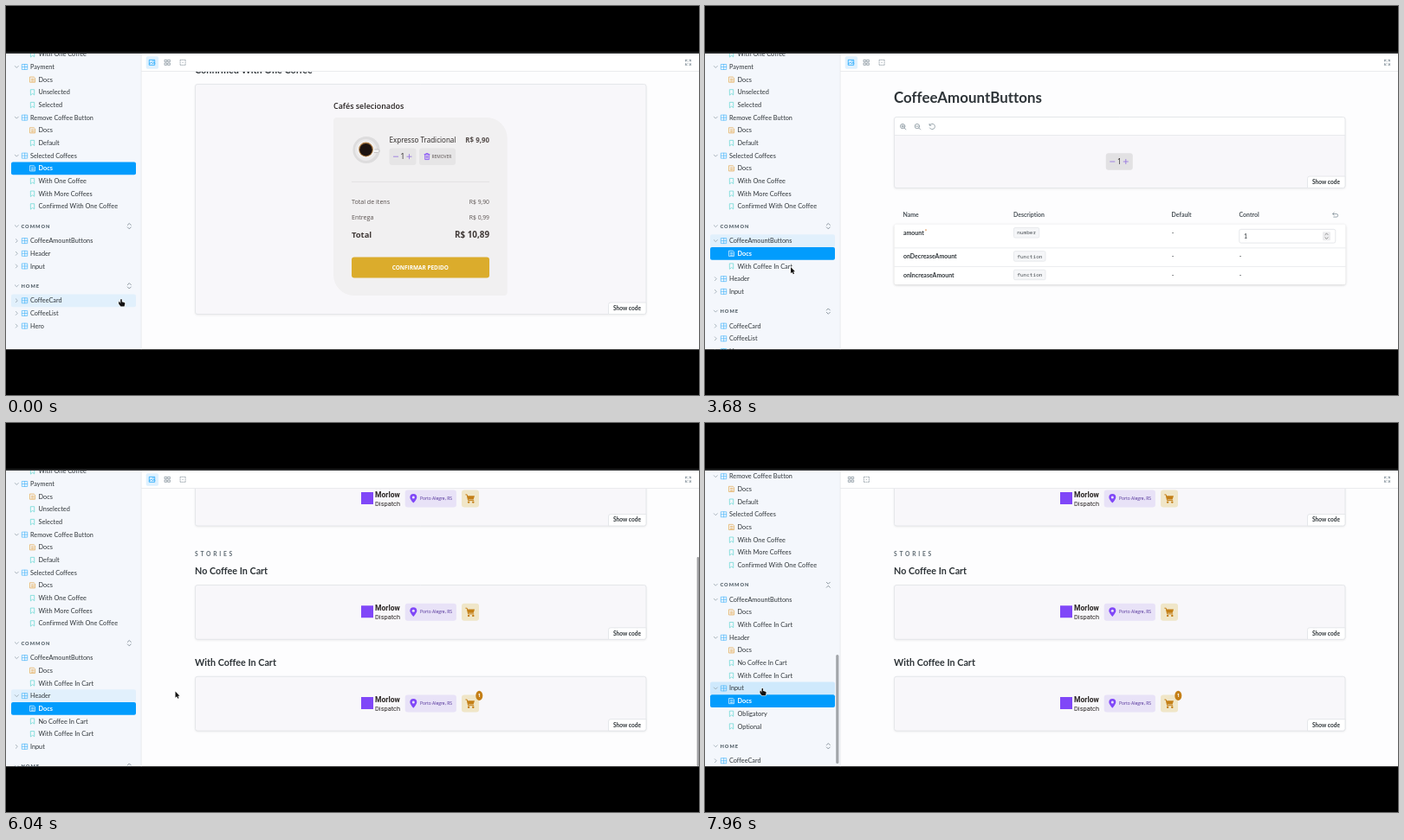
These frames come from a looping animation (800 by 450 pixels, 8000 ms). An HTML page with a canvas:

```html
<!DOCTYPE html>
<html lang="en">
<head>
<meta charset="utf-8">
<title>Component docs</title>
<style>
html, body { margin: 0; width: 100%; height: 100%; overflow: hidden; background: #000; }
canvas { display: block; width: 800px; height: 450px; }
</style>
</head>
<body>
<canvas id="stage" width="800" height="450"></canvas>
<script>
const g = document.getElementById('stage').getContext('2d');
const LOOP = 8000, TOP = 55, BOTTOM = 397.4, BAR = 76;
const UI = 'Lato, "Open Sans", sans-serif';
const APP = '"Open Sans", "Noto Sans", sans-serif';
const MONO = '"Noto Sans Mono", "DejaVu Sans Mono", monospace';
const INK = '#2e3438', BLUE = '#029cfd', GREY = '#7d8b95', LINE = '#e5e7ea';
const PURPLE = '#8047f8', GOLD = '#c47f17';

// Times of the three clicks in the sidebar
const CLICK = { amount: 1800, header: 4480, input: 7840 };

// ---------- drawing helpers ----------
function text(s, x, y, size, o = {}) {
  g.font = `${o.w || 400} ${size}px ${o.f || UI}`;
  g.letterSpacing = (o.ls || 0.01) + 'px'; // any spacing turns ligatures off
  g.textAlign = o.a || 'left';
  g.fillStyle = o.c || INK;
  g.fillText(s, x, y + size * 0.35);
  g.letterSpacing = '0px';
}
function box(x, y, w, h, r, fill, stroke) {
  g.beginPath();
  g.roundRect(x, y, w, h, r);
  if (fill) { g.fillStyle = fill; g.fill(); }
  if (stroke) { g.strokeStyle = stroke; g.lineWidth = 1; g.stroke(); }
}
function disc(x, y, rx, ry, fill) {
  g.beginPath();
  g.ellipse(x, y, rx, ry, 0, 0, 7);
  g.fillStyle = fill;
  g.fill();
}
function path(d, x, y, color, width = 0.8, fill) {
  g.save();
  g.translate(x, y);
  const p = new Path2D(d);
  if (fill) { g.fillStyle = fill; g.fill(p); }
  if (color) {
    g.strokeStyle = color;
    g.lineWidth = width;
    g.lineCap = g.lineJoin = 'round';
    g.stroke(p);
  }
  g.restore();
}
function clip(x, y, w, h, draw) {
  g.save();
  g.beginPath();
  g.rect(x, y, w, h);
  g.clip();
  draw();
  g.restore();
}

// ---------- motion ----------
const ease = k => k * k * (3 - 2 * k);
const ramp = (t, a, b) => ease(Math.min(1, Math.max(0, (t - a) / (b - a))));

const TRAIL = [
  [40, 133, 339.2], [440, 95.3, 272.5], [1120, 95.3, 272.5], [1160, 95.8, 272.5],
  [2760, 95.8, 272.5], [3150, 203, 296], [3640, 101, 301], [3680, 99, 302],
  [4200, 46, 313], [4600, 46, 313], [5120, 195.5, 310.5], [6160, 195.5, 310.5],
  [6480, 83, 310], [7000, 83, 310], [7480, 66.3, 307], [LOOP, 66.3, 307]
];
function pointer(t) {
  let [, x, y] = TRAIL[0];
  for (let i = 1; i < TRAIL.length; i++) {
    const a = TRAIL[i - 1], b = TRAIL[i], k = ramp(t, a[0], b[0]);
    if (t >= a[0]) { x = a[1] + (b[1] - a[1]) * k; y = a[2] + (b[2] - a[2]) * k; }
  }
  return { x, y };
}
const SIDE_MAX = 67.4, PAGE_MAX = 93.3;
const sideScroll = t => SIDE_MAX * ramp(t, 6440, 6700);
const pageScroll = t => PAGE_MAX * ramp(t, 5440, 5960);

// ---------- sidebar ----------
function tree(t) {
  const sel = t < CLICK.amount ? 'Selected Coffees' : t < CLICK.header ? 'CoffeeAmountButtons'
    : t < CLICK.input ? 'Header' : 'Input';
  const rows = [];
  let y = 55.8, last = 'story';
  const add = (kind, label, more) => {
    if (rows.length) y += kind === 'head' ? 22.8 : last === 'head' ? 17 : 14.67;
    last = kind;
    rows.push({ kind, label, y, ...more });
  };
  const part = (label, stories, open = true) => {
    add('part', label, { open, focus: label === sel && t >= CLICK.amount });
    if (!open) return;
    add('docs', 'Docs', { sel: label === sel });
    stories.forEach(s => add('story', s));
  };
  add('story', 'With One Coffee');
  part('Payment', ['Unselected', 'Selected']);
  part('Remove Coffee Button', ['Default']);
  part('Selected Coffees', ['With One Coffee', 'With More Coffees', 'Confirmed With One Coffee']);
  add('head', 'COMMON', { all: t >= CLICK.input });
  part('CoffeeAmountButtons', ['With Coffee In Cart'], t >= CLICK.amount);
  part('Header', ['No Coffee In Cart', 'With Coffee In Cart'], t >= CLICK.header);
  part('Input', ['Obligatory', 'Optional'], t >= CLICK.input);
  add('head', 'HOME');
  ['CoffeeCard', 'CoffeeList', 'Hero'].forEach(s => part(s, [], false));
  return rows;
}
function chevron(x, y, open) {
  path(open ? 'M-2-1L0 1L2-1' : 'M-1-2L1 0L-1 2', x, y, '#8a98a2', 0.7);
}
function row(r, y, hover) {
  if (r.kind === 'head') {
    chevron(12.3, y, true);
    text(r.label, 17.5, y, 5.7, { w: 900, c: '#5c6870', ls: 0.95 });
    path(r.all ? 'M-2-3L0-1L2-3M-2 3L0 1L2 3' : 'M-2-1.2L0-3.2L2-1.2M-2 1.2L0 3.2L2 1.2', 142.3, y, '#6b7983', 0.75);
    return;
  }
  const bar = color => box(6, y - 7.4, 144, 14.8, 2, color);
  const tint = () => bar('rgba(2,156,253,.08)');
  if (r.sel) bar(BLUE);
  else {
    if (r.focus) tint();
    if (hover) tint();
  }
  if (r.kind === 'part') {
    chevron(12.3, y, r.open);
    path('M-3-3H3V3H-3ZM0-3V3M-3 0H3', 21.7, y, '#3fb2fb', 0.65);
    text(r.label, 28, y, 7.25);
  } else if (r.kind === 'docs') {
    path('M-2.8-3.1H1.5L2.8-1.8V3.1H-2.8ZM-1.4-1H1.4M-1.4.5H1.4M-1.4 2H1.4', 30.7, y, r.sel ? '#fff' : '#e3a446', 0.65);
    text(r.label, 37.5, y, 7.3, r.sel ? { w: 700, c: '#fff' } : {});
  } else {
    path('M-2-3.1H2V3.1L0 1.5L-2 3.1Z', 30.7, y, '#5fd6d2', 0.7);
    text(r.label, 37.5, y, 7.35);
  }
}
function sidebar(t, p) {
  g.fillStyle = '#f4f7fc';
  g.fillRect(0, TOP, 156, BOTTOM - TOP);
  const s = sideScroll(t);
  const live = t < CLICK.amount || (t > 3720 && t < CLICK.header) || t > 7000;
  for (const r of tree(t)) {
    const y = r.y - s;
    if (y < 46 || y > 406) continue;
    row(r, y, live && p.x < 150 && Math.abs(p.y - y) < 7.33);
  }
  let thumb = null;
  if (t >= CLICK.amount && t < 2600) thumb = [253, 132];
  else if (t >= CLICK.header && t < 5440) thumb = [243, 126];
  else if (t >= 6440 && t < 7400) thumb = [243 + 24 * s / SIDE_MAX, 126];
  else if (t >= CLICK.input) thumb = [268, 126];
  if (thumb) box(151.2, thumb[0], 3.2, thumb[1], 1.6, '#a2a6aa');
}

// ---------- toolbar ----------
const GRID = 'M-3-3H-.7V-.7H-3ZM.7-3H3V-.7H.7ZM-3 .7H-.7V3H-3ZM.7 .7H3V3H.7Z';
const OUTLINE = 'M-3-1.7V-3H-1.7M-.5-3H.5M1.7-3H3V-1.7M3-.5V.5M3 1.7V3H1.7M.5 3H-.5M-1.7 3H-3V1.7M-3 .5V-.5M-.3 0H.3';
function toolbar(full) {
  g.fillStyle = '#fff';
  g.fillRect(156, TOP, 644, BAR - TOP);
  g.fillStyle = LINE;
  g.fillRect(156, BAR - 0.8, 644, 0.8);
  if (full) {
    box(161.7, 58.3, 14.4, 14.4, 2, '#dff1fe');
    path('M-3-3H3V3H-3ZM-3 1.6L-1-.5L1 1.5L2-.1L3 1M.8-1.5H1.6', 168.7, 65.3, BLUE, 0.7);
  }
  const x = full ? 186.4 : 168.7;
  path(GRID, x, 65.3, GREY, 0.7);
  path(OUTLINE, x + 17.7, 65.3, GREY, 0.65);
  path('M-3-1.2V-3H-1.2M1.2-3H3V-1.2M3 1.2V3H1.2M-1.2 3H-3V1.2M-3-3L-1-1M3-3L1-1M3 3L1 1M-3 3L-1 1', 787.5, 65.3, GREY, 0.7);
}

// ---------- page pieces ----------
function panel(y, h, tools) {
  g.save();
  g.shadowColor = 'rgba(0,0,0,.09)';
  g.shadowBlur = 3;
  g.shadowOffsetY = 1;
  box(218.5, y, 520.5, h, 2.5, '#f8f7fa');
  g.restore();
  if (tools) {
    box(218.5, y, 520.5, 21, [2.5, 2.5, 0, 0], '#fff');
    g.fillStyle = LINE;
    g.fillRect(218.5, y + 20.5, 520.5, 0.8);
    for (const [x, sign] of [[228.7, 'M-1.8-.4H.8M-.5-1.7V.9'], [245.4, 'M-1.8-.4H.8']])
      path('M2.2-.4A2.7 2.7 0 1 1-3.2-.4A2.7 2.7 0 1 1 2.2-.4M1.5 1.6L3.3 3.4' + sign, x, y + 11, GREY, 0.75);
    path('M-2.8-1.8A3.2 3.2 0 1 1-2.9 1.5M-3.2-3.2V-1.3H-1.3', 262.3, y + 11, GREY, 0.75);
  }
  box(218.5, y, 520.5, h, 2.5, null, LINE);
  const end = y + h;
  box(695.5, end - 13.5, 43.5, 13.5, [2.5, 0, 2.5, 0], '#fff', LINE);
  text('Show code', 717, end - 6.8, 6.55, { w: 700, a: 'center' });
}
function spinner(x, y, t) {
  const a = (t - 2400) / 700 * Math.PI * 2;
  g.lineWidth = 1;
  for (const [from, to, c] of [[0, 6.3, '#d3d3d6'], [a - 0.9, a + 1.3, '#66696d']]) {
    g.beginPath();
    g.arc(x, y, 8, from, to);
    g.strokeStyle = c;
    g.stroke();
  }
}
function counter(x, y, fill) {
  box(x - 15.5, y - 9.7, 31, 19.4, 3, fill);
  path('M-2.6 0H2.6', x - 8, y, '#9a7ae0', 0.9);
  path('M-2.6 0H2.6M0-2.6V2.6', x + 7.5, y, '#9a7ae0', 0.9);
  text('1', x, y, 8.4, { f: APP, a: 'center', c: '#272221' });
}

function orderPage() {
  text('Confirmed With One Coffee', 218, 74, 10.8, { w: 700 });
  panel(90.5, 266, false);
  const o = { f: APP, c: '#574f4d' }, right = { ...o, a: 'right' };
  const dark = { f: APP, c: '#403937', w: 700 };
  text('Cafés selecionados', 378, 116.3, 8.9, { f: APP, w: 600, c: '#272221' });
  box(378, 129, 200.7, 206, [4, 24, 4, 24], '#f1f0f1');

  disc(416, 166.5, 15.6, 15.6, '#dddcdd');
  disc(415.5, 166.5, 12.5, 12.5, '#ebeaeb');
  box(423, 166, 8, 3.4, 1.5, '#f7f7f7', '#c3c1c2');
  disc(415.5, 166, 9.8, 9.8, '#f8f7f6');
  disc(415.5, 166, 8.4, 8.4, '#a97a45');
  disc(415.5, 166.2, 7.3, 7.3, '#1d1310');

  text('Expresso Tradicional', 442.5, 155, 8.06, { f: APP, c: '#272221' });
  text('R$ 9,90', 558, 155, 7.9, { ...dark, c: '#574f4d', a: 'right' });
  counter(458, 174.2, '#e6e5e6');
  box(477, 164.5, 42, 19.4, 3, '#e6e5e6');
  path('M-3-2.5H3M-1.2-2.5V-3.6H1.2V-2.5M-2.3-2.5V3.4H2.3V-2.5M-.8-.8V1.8M.8-.8V1.8', 486, 174.2, PURPLE, 0.8);
  text('REMOVER', 491.5, 174.4, 4.95, o);
  g.fillStyle = '#e4e3e4';
  g.fillRect(399, 202.8, 159, 1.3);
  text('Total de itens', 399, 227, 7.1, o);
  text('R$ 9,90', 558, 227, 6.8, right);
  text('Entrega', 399, 244.5, 7.1, o);
  text('R$ 0,99', 558, 244.5, 6.8, right);
  text('Total', 399, 265, 9.4, dark);
  text('R$ 10,89', 558, 265, 9.8, { ...dark, a: 'right' });
  box(399, 290.5, 159, 24, 3, '#dbac2c');
  text('CONFIRMAR PEDIDO', 478.3, 302.3, 6.45, { f: APP, w: 700, c: '#fff', a: 'center' });
}

function pill(label, x, y) {
  g.font = `400 6.05px ${MONO}`;
  box(x, y - 6, g.measureText(label).width + 7.5, 11.5, 1.5, '#f5f6f8', '#e8eaed');
  text(label, x + 3.8, y - 0.3, 6.05, { f: MONO, c: '#4a5055' });
}
function amountPage(t) {
  const ready = t >= 2520, h = ready ? 61 : 42, end = 149.5 + h;
  text('CoffeeAmountButtons', 218, 106, 16.9, { w: 700 });
  panel(128.5, h + 21, true);
  if (ready) counter(478.3, 180, '#e2e1e3');
  else spinner(478.5, 170.5, t);

  const bold = { w: 700 }, size = 6.95;
  [['Name', 228.5], ['Description', 356], ['Default', 538.5], ['Control', 616.5]]
    .forEach(([s, x]) => text(s, x, end + 31, size, { w: 700, c: '#4b5359' }));
  path('M-3-1H1.2A1.8 1.8 0 0 1 1.2 2.6H-2M-1.4-2.7L-3.1-1L-1.4 .7', 727.7, end + 31, GREY, 0.75);
  g.save();
  g.shadowColor = 'rgba(0,0,0,.2)';
  g.shadowBlur = 3;
  g.shadowOffsetY = 0.8;
  box(218.5, end + 42, 521, 69.7, 2.5, '#fff');
  g.restore();
  g.fillStyle = LINE;
  g.fillRect(218.5, end + 69, 521, 0.8);
  g.fillRect(218.5, end + 90.4, 521, 0.8);
  [['amount', 'number', 52], ['onDecreaseAmount', 'function', 79.2], ['onIncreaseAmount', 'function', 100.7]]
    .forEach(([name, type, dy], i) => {
      const y = end + dy;
      text(name, 229, y, size, bold);
      pill(type, 356.5, y);
      text('-', 538.7, y, 7.2);
      if (i) text('-', 616.8, y, 7.2);
    });
  text('*', 253.5, end + 51.5, 7, { c: '#d9843b' });
  box(616.8, end + 47.8, 111, 15.8, 2, '#fff', LINE);
  text('1', 622, end + 55.7, 7.2);
  box(713, end + 50.7, 9, 10, 1, '#ececee');
  path('M-1.6-1.6L0-3.2L1.6-1.6M-1.6 1.6L0 3.2L1.6 1.6', 717.5, end + 55.7, '#777', 0.8);
}

function banner(y, logo, badge) {
  const x = logo ? 460.7 : 439;
  if (logo) {
    box(410, y - 7.5, 14, 14, 0, PURPLE);
    const name = { f: 'Roboto, sans-serif', c: '#2b2625' };
    text('Morlow', 426, y - 4.5, 8.5, { ...name, w: 700 });
    text('Dispatch', 426, y + 6, 7.4, name);
  }
  box(x, y - 10, 59.2, 20, 3, '#e8e2f7');
  path('M0 5.2C-2.6 2.4-4-.1-4-1.5A4 4 0 0 1 4-1.5C4-.1 2.6 2.4 0 5.2Z', x + 9.6, y, null, 0, PURPLE);
  disc(x + 9.6, y - 1.4, 1.5, 1.5, '#e8e2f7');
  text('Porto Alegre, RS', x + 17.3, y, 4.95, { f: APP, c: '#4b2995' });
  box(x + 65.3, y - 10, 20, 20, 3, '#f0e6c8');
  path('M-5.2-4.5H-3.8L-2.4 2.2H3.8', x + 75.3, y, GOLD, 1);
  path('M-3.5-3.2H5L3.7 1H-2.7Z', x + 75.3, y, null, 0, GOLD);
  disc(x + 73.4, y + 4.2, 1.2, 1.2, GOLD);
  disc(x + 78.6, y + 4.2, 1.2, 1.2, GOLD);
  if (badge) {
    disc(x + 85.6, y - 9.1, 4, 5.6, GOLD);
    text('1', x + 85.6, y - 9.1, 5.6, { f: APP, w: 700, c: '#fff', a: 'center' });
  }
}
function headerPage(t) {
  const logo = t >= 5320, h = logo ? 62.8 : 42, s = pageScroll(t);
  const end = 149.5 + h - s, top2 = end + 68.5, end2 = top2 + h, top3 = end2 + 43;
  const content = (y, badge) => t < 5080 ? spinner(478.5, y + 21, t) : banner(y + 31.2, logo, badge);
  text('Header', 218, 106 - s, 16.9, { w: 700 });
  panel(128.5 - s, h + 21, true);
  content(149.5 - s);
  text('STORIES', 218, end + 33, 6.7, { w: 700, c: '#5c6870', ls: 2.75 });
  text('No Coffee In Cart', 218, end + 52.3, 10.75, { w: 700 });
  panel(top2, h, false);
  content(top2);
  text('With Coffee In Cart', 218, end2 + 27.3, 10.75, { w: 700 });
  panel(top3, h, false);
  content(top3, true);
  if (t < 7400) box(797.6, BAR + 79 * s / PAGE_MAX, 2.4, logo ? 242 : 290, 1, '#a0a0a3');
}

// ---------- cursor ----------
function cursor(t, p) {
  const hand = p.x < 156 && !(t > 2760 && t < 3720);
  const d = hand
    ? 'M-.8 .4Q0-.7 .8 .4V3L3.6 3.7Q4.5 4 4.3 5.2L3.6 8.2H-.6L-2.9 5.2Q-3-.0 -.8 5Z'
    : 'M0 0V7.2L1.7 5.7L2.8 8.2L4 7.7L2.9 5.2H5Z';
  path(d, p.x, p.y, '#fff', 1.2);
  path(d, p.x, p.y, null, 0, '#111');
}

// ---------- scene ----------
function draw(t) {
  const p = pointer(t);
  g.fillStyle = '#000';
  g.fillRect(0, 0, 800, 450);
  g.fillStyle = '#232425';
  g.fillRect(0, 53, 800, 2);
  clip(0, TOP, 800, BOTTOM - TOP, () => {
    g.fillStyle = '#fdfdfe';
    g.fillRect(156, TOP, 644, BOTTOM - TOP);
    clip(156, BAR, 644, BOTTOM - BAR, () => {
      if (t < 2040) orderPage();
      else if (t >= 2160 && t < 4680) amountPage(t);
      else if (t >= 4800) headerPage(t);
    });
    const loading = (t >= CLICK.amount && t < 2160) || (t >= CLICK.header && t < 4800) || t >= CLICK.input;
    toolbar(!loading);
    sidebar(t, p);
    g.fillStyle = LINE;
    g.fillRect(155.7, TOP, 0.8, BOTTOM - TOP);
    cursor(t, p);
  });
}
function tick(now) {
  draw(now % LOOP);
  requestAnimationFrame(tick);
}
draw(0);
requestAnimationFrame(tick);
</script>
</body>
</html>
```
